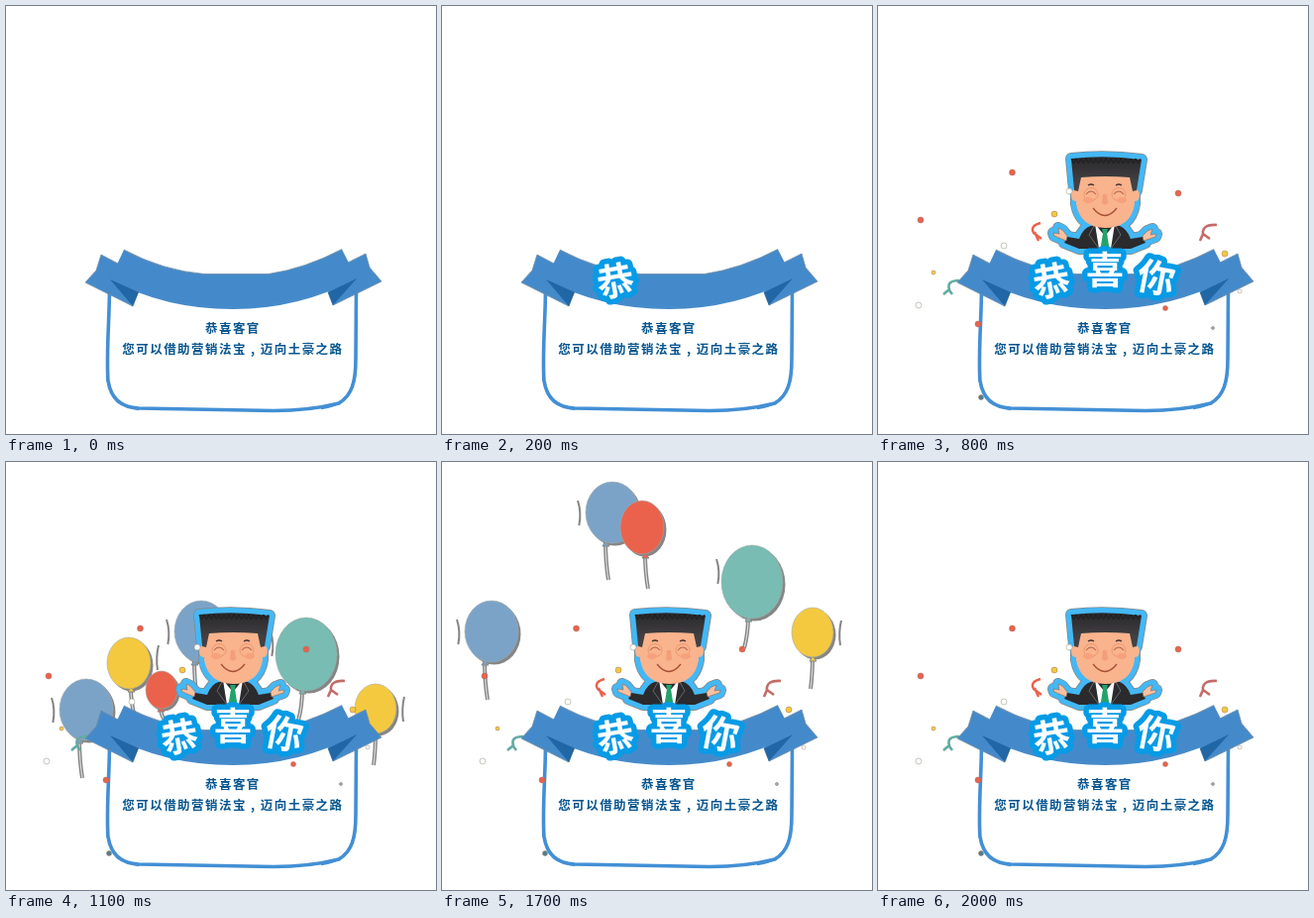
Animation, 434 px wide and 432 px high, one loop 2300 ms. Source, as an HTML page with a canvas:

```html
<!DOCTYPE html>
<html lang="zh">
<head>
<meta charset="utf-8">
<style>
  html, body { margin: 0; width: 100%; height: 100%; overflow: hidden; background: #fff; }
  canvas { display: block; }
</style>
</head>
<body>
<canvas id="stage" width="434" height="432"></canvas>
<script>
const ctx = document.getElementById('stage').getContext('2d');
const LOOP = 2300;
const FONT = '"Noto Sans CJK SC", "Noto Sans CJK", sans-serif';
const BLUE = '#7ba3c8', YELLOW = '#f4c93f', RED = '#ea624c', TEAL = '#78bcb3';
const GREY = '#858585', BAND = '#448aca', FOLD = '#2267a5', HALO = '#43b8f6';
const SKIN = '#f9b38d', INK = '#2b2a2d';

const titles = [
  { ch: '恭', x: 175, y: 277, turn: -0.17, from: 200 },
  { ch: '喜', x: 229, y: 265.5, turn: 0, from: 400 },
  { ch: '你', x: 281, y: 274, turn: 0.19, from: 600 }
];

// stops: centre at each rise step; tail: string start and end; mark: speed line
const balloons = [
  { color: BLUE, rx: 27, ry: 31, tail: [-7, 32, -4, 69], mark: [-35, 0],
    stops: [[81, 250], [81, 224], [50, 171]] },
  { color: YELLOW, rx: 22, ry: 26, tail: [2, 27, 6, 54], mark: [30, -6],
    stops: [[124, 203], [124, 177]] },
  { color: RED, rx: 16, ry: 19, tail: [-1, 20, 5, 33], mark: null,
    stops: [[157, 230], [157, 203]] },
  { color: BLUE, rx: 27, ry: 31, tail: [-7, 32, -4, 68], mark: [-35, 0],
    stops: [[197, 171], [222, 97], [172, 51]] },
  { color: RED, rx: 22, ry: 27, tail: [3, 29, 6, 62], mark: null,
    stops: [[227, 174], [252, 111], [202, 66]] },
  { color: TEAL, rx: 31, ry: 37, tail: [-4, 38, -8, 67], mark: [-36, -11],
    stops: [[303, 194], [303, 168], [313, 121]] },
  { color: YELLOW, rx: 21, ry: 25, tail: [0, 27, -2, 57], mark: [29, 0],
    stops: [[373, 249], [373, 223], [374, 172]] }
];

const dots = [
  [43, 216, 3, RED], [135.5, 168, 3, RED], [303, 189, 3, RED], [290, 305, 2.5, RED],
  [101, 321, 3, RED], [178, 210, 3, YELLOW], [350, 250, 3, YELLOW], [56, 269, 2, YELLOW],
  [193, 187, 3, '#fff'], [127, 242, 3, '#fff'], [41, 302, 3, '#fff'],
  [365, 288, 2, '#fff'], [338, 325, 1.6, TEAL], [104, 395, 2.5, '#4d8290']
];

function shape(d, fill, stroke, width = 1) {
  const path = new Path2D(d);
  if (fill) { ctx.fillStyle = fill; ctx.fill(path); }
  if (stroke) {
    ctx.strokeStyle = stroke;
    ctx.lineWidth = width;
    ctx.stroke(path);
  }
}

function oval(x, y, rx, ry, fill, stroke, width = 1) {
  ctx.beginPath();
  ctx.ellipse(x, y, rx, ry, 0, 0, Math.PI * 2);
  if (fill) { ctx.fillStyle = fill; ctx.fill(); }
  if (stroke) { ctx.strokeStyle = stroke; ctx.lineWidth = width; ctx.stroke(); }
}

function spacedText(text, y) {
  ctx.font = `bold 12.5px ${FONT}`;
  ctx.fillStyle = '#07558f';
  const pitch = 13.95, left = 228.2 - (text.length - 1) * pitch / 2;
  [...text].forEach((ch, i) => ctx.fillText(ch, left + i * pitch, y));
}

function drawCard() {
  shape('M104.500 284 C104.500 315 101 352 103 378 C106 398 117 405 134 406 L270 408.500 ' +
    'C302 408.500 320 405 336 401 C349 393 353 380 353 356 L353.500 285', null, '#438fd5', 3.6);
  shape('M102 373 Q105 403 134 407 M318 406 Q346 403 351 378', null, '#438fd5', 2.5);
  spacedText('恭喜客官', 325);
  spacedText('您可以借助营销法宝,迈向土豪之路', 346);
}

function drawBanner() {
  const edge = '#718ba3';
  shape('M96 251 L113 260 L133 289 L128 303 L80 279 L91 267 Z', BAND, edge, .8);
  shape('M363 250 L345 259 L325 289 L330 302 L379 278 L367 264 Z', BAND, edge, .8);
  shape('M119 246 Q158 267 200 270.5 L265 270.5 Q302 265 339 245.500 L354 275 ' +
    'Q296 306 229 306 Q160 306 105 276 Z', BAND);
  shape('M119 246 Q158 267 200 270.500 L265 270.500 Q302 265 339 245.500', null, edge, .8);
  shape('M105 276 L134 289 L128 303 Z', FOLD);
  shape('M354 275 L325 289 L330 302 Z', FOLD);
}

function drawBalloon(b, step) {
  if (!b.stops[step]) return;
  ctx.save();
  ctx.translate(...b.stops[step]);
  const [x0, y0, x1, y1] = b.tail;
  const string = `M${x0} ${y0 - 3} Q${x0} ${(y0 + y1) / 2} ${x1} ${y1}`;
  shape(string, null, GREY, 4);
  shape(string, null, '#d9dddd', 1.2);
  oval(2.5, 2.5, b.rx, b.ry, GREY);
  shape(`M${x0 - 3} ${y0 + 2} l3 -5 l4 5 z`, b.color, GREY);
  oval(0, 0, b.rx, b.ry, b.color, '#a3a9a6', .6);
  if (b.mark) {
    const [x, y] = b.mark, bend = x < 0 ? 4 : -3;
    shape(`M${x} ${y - 12} q${bend} 12 ${bend / 3} 25`, null, GREY, 2);
  }
  ctx.restore();
}

function drawConfetti() {
  for (const [x, y, r, color] of dots) {
    oval(x, y, r, r, color, color === '#fff' ? '#938c78' : '#a06e5c', .5);
  }
  shape('M164 219 Q153 222 157 229 L165 235 M158 228 L162 237', null, RED, 2.4);
  shape('M342 221 Q327 220 328 230 L325 237 M328 230 L335 235', null, '#c46c68', 2.6);
  shape('M82 277 Q69 277 72 286 L66 291 M72 287 L75 291', null, '#62aaa2', 2.6);
}

const hair = 'M195 154 Q230 150 266 155 L261 186 L257 187 L254 173 Q229 171 205 173 L202 187 L198 186 Z';
const face = 'M200 171 H259 V200 Q255 224 229 224 Q204 223 200 200 Z';
const torso = 'M213 223 L220 220 H238 L246 223 L249 245 H209 Z';
const arms = [
  'M215 222 Q207 224 203 235 L191 233 L188 239 L203 245 H214 Z',
  'M243 222 Q251 224 255 235 L267 233 L270 239 L255 245 H244 Z'
];
const hands = [
  'M190 237 L178 232 L177 229 L183 230 L182 224 L186 226 L191 232 Z',
  'M268 237 L280 233 L281 230 L275 231 L277 225 L272 227 L267 232 Z'
];

function drawBody() {
  [torso, ...arms].forEach(d => shape(d, INK));
  hands.forEach(d => shape(d, '#f9c09f', '#8b6957', .6));
  shape('M219 220 L229 232 L239 220 L235 245 H223 Z', '#fff');
  shape('M226 225 H232 L231 229 L233.500 245 H224.500 L227 229 Z', '#23a36a');
  shape('M218 222 L213 231 L223 245 M240 222 L245 231 L235 245', null, '#65686c', 1);
}

function drawHead() {
  oval(199, 191, 4, 6, SKIN);
  oval(260, 191, 4, 6, SKIN);
  shape(face, SKIN);
  const shine = ctx.createLinearGradient(0, 153, 0, 178);
  shine.addColorStop(0, '#29282a');
  shine.addColorStop(1, '#434144');
  shape(hair, shine);
  let tips = 'M195 154';
  for (let x = 195; x < 264; x += 5) tips += ' l2.500 5 l2.500 -5';
  shape(tips, null, '#1d1c1e', 1);
  for (const x of [215, 243]) {
    oval(x, 190, 7, 6.5, null, '#e99267', .8);
    oval(x + (x < 229 ? -3 : 3), 196, 5, 3, '#f7a17c');
    shape(`M${x - 5} 190 Q${x} 184 ${x + 5} 190`, null, '#b4674a', 1.1);
    shape(`M${x - 3} 181 q3 -2 6 0`, null, '#493331', 1.3);
  }
  shape('M227 190 L226 199 Q229 202 232 199 L231 190', '#f29f79');
  shape('M217 204 Q229 219 241 204', null, '#a84e36', 1.3);
}

function drawMan() {
  ctx.lineJoin = 'round';
  const outline = [hair, face, torso, ...arms, ...hands];
  outline.forEach(d => shape(d, GREY, GREY, 12));
  outline.forEach(d => shape(d, HALO, HALO, 10.5));
  drawBody();
  drawHead();
}

function drawTitle({ ch, x, y, turn }) {
  ctx.save();
  ctx.translate(x, y);
  ctx.rotate(turn);
  ctx.font = `bold 38px ${FONT}`;
  ctx.lineJoin = 'round';
  ctx.lineWidth = 11;
  ctx.strokeStyle = '#079be6';
  ctx.strokeText(ch, 0, 0);
  ctx.fillStyle = '#fff';
  ctx.fillText(ch, 0, 0);
  ctx.restore();
}

function draw(t) {
  ctx.fillStyle = '#fff';
  ctx.fillRect(0, 0, 434, 432);
  ctx.textAlign = 'center';
  ctx.textBaseline = 'middle';
  drawCard();
  if (t >= 1100 && t < 2000) {
    const step = Math.floor((t - 1100) / 300);
    balloons.forEach(b => drawBalloon(b, step));
  }
  if (t >= 800) {
    drawMan();
    drawConfetti();
  }
  drawBanner();
  titles.filter(item => t >= item.from).forEach(drawTitle);
}

const start = performance.now();
function tick() {
  draw((performance.now() - start) % LOOP);
  requestAnimationFrame(tick);
}
tick();
</script>
</body>
</html>
```
